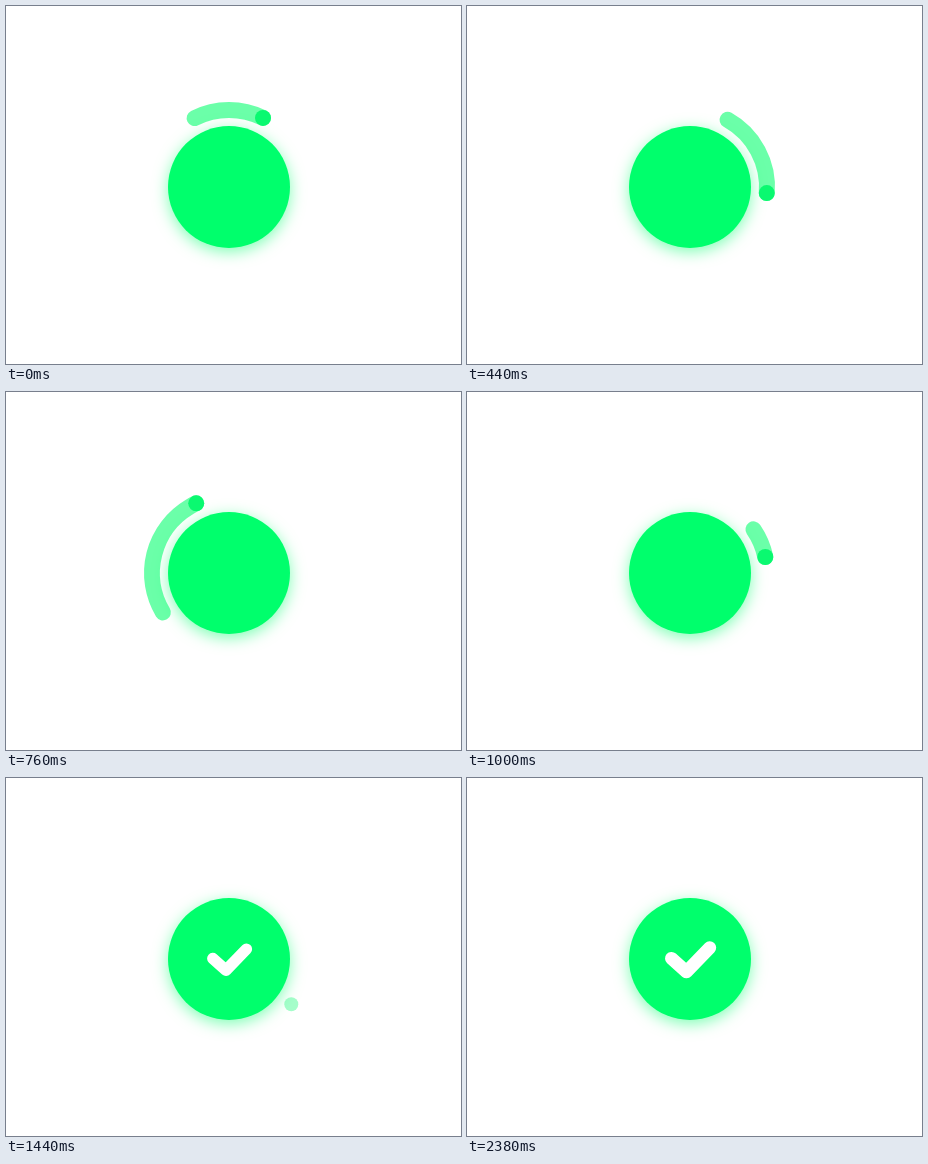
These frames come from a looping animation (455 px wide and 358 px high, 3.32 s). An HTML page with a canvas:

```html
<!DOCTYPE html>
<html lang="en">
<head>
<meta charset="utf-8">
<title>Loader to check</title>
<style>
  html, body { margin: 0; width: 100%; height: 100%; overflow: hidden; background: #fff; }
  canvas { display: block; }
</style>
</head>
<body>
<canvas id="stage" width="455" height="358"></canvas>
<script>
const ctx = document.getElementById('stage').getContext('2d');

const LOOP = 3320, HOLD_FROM = 2380, STEP = 20;
const CX = 223, CY = 181, DISC_R = 61, ORBIT_R = 77, DOT_R = 8;
const GREEN = '#00ff6c', DOT_GREEN = '#0af970';

// Keys: [time in ms, degrees clockwise from the top, degrees per ms]
const HEAD = [[0, 26.2, 0], [440, 94.5, .42], [760, 334.8, .85],
              [1000, 438, .2], [1440, 486, .06], [1700, 494, 0]];
const TAIL = [[0, -26.5, 0], [440, 29.2, .36], [760, 239.2, .9],
              [1000, 415.5, .42], [1100, 455, .18]];

const clamp = (v, lo = 0, hi = 1) => Math.min(hi, Math.max(lo, v));
const toAngle = deg => (deg - 90) * Math.PI / 180;

// Cubic Hermite interpolation between keys
function valueAt(keys, t) {
  const i = keys.findIndex(key => key[0] > t);
  if (i < 0) return keys[keys.length - 1][1];
  const [t0, v0, m0] = keys[i - 1], [t1, v1, m1] = keys[i];
  const d = t1 - t0, u = (t - t0) / d, w = 1 - u;
  return v0 * (1 + 2 * u) * w * w + m0 * d * u * w * w
       + v1 * u * u * (3 - 2 * u) - m1 * d * u * u * w;
}

// Linear growth followed by a decaying oscillation
function checkScale(t) {
  const start = 1000, full = 1130;
  if (t < full) return clamp((t - start) / (full - start));
  const s = (t - full) / 1000;
  return 1 + .326 * Math.sin(4 * Math.PI * s) * Math.exp(-2 * s);
}

function fillCircle(x, y, r, color) {
  ctx.fillStyle = color;
  ctx.beginPath();
  ctx.arc(x, y, r, 0, Math.PI * 2);
  ctx.fill();
}

function drawDisc() {
  ctx.save();
  ctx.shadowColor = 'rgba(0, 255, 108, .5)';
  ctx.shadowBlur = 15;
  ctx.shadowOffsetY = 4;
  fillCircle(CX, CY, DISC_R, GREEN);
  ctx.restore();
}

function drawOrbit(t) {
  const alpha = 1 - clamp((t - 1180) / 410);
  if (alpha === 0) return;
  const head = valueAt(HEAD, t);
  const tail = t < 1100 ? Math.min(head, valueAt(TAIL, t)) : head;
  const angle = toAngle(head);

  if (head - tail > .5) {
    ctx.strokeStyle = 'rgba(0, 255, 108, .58)';
    ctx.lineWidth = DOT_R * 2;
    ctx.beginPath();
    ctx.arc(CX, CY, ORBIT_R, toAngle(tail), angle);
    ctx.stroke();
  }
  ctx.globalAlpha = alpha;
  fillCircle(CX + ORBIT_R * Math.cos(angle), CY + ORBIT_R * Math.sin(angle),
             DOT_R * (.8 + .2 * alpha), DOT_GREEN);
  ctx.globalAlpha = 1;
}

function drawCheck(t) {
  const scale = checkScale(t);
  if (scale <= 0) return;
  ctx.save();
  ctx.translate(223.6, 181.6);
  ctx.scale(scale, scale);
  ctx.strokeStyle = '#fff';
  ctx.lineWidth = 13;
  ctx.beginPath();
  ctx.moveTo(-19.1, -1.2);
  ctx.lineTo(-4.1, 12.2);
  ctx.lineTo(19.1, -11.9);
  ctx.stroke();
  ctx.restore();
}

function draw(now) {
  const t = Math.min(HOLD_FROM, Math.floor((now % LOOP) / STEP) * STEP);
  ctx.fillStyle = '#fff';
  ctx.fillRect(0, 0, 455, 358);
  ctx.lineCap = ctx.lineJoin = 'round';
  drawDisc();
  drawOrbit(t);
  drawCheck(t);
}

const begin = performance.now();
function tick() {
  draw(performance.now() - begin);
  requestAnimationFrame(tick);
}
tick();
</script>
</body>
</html>
```
